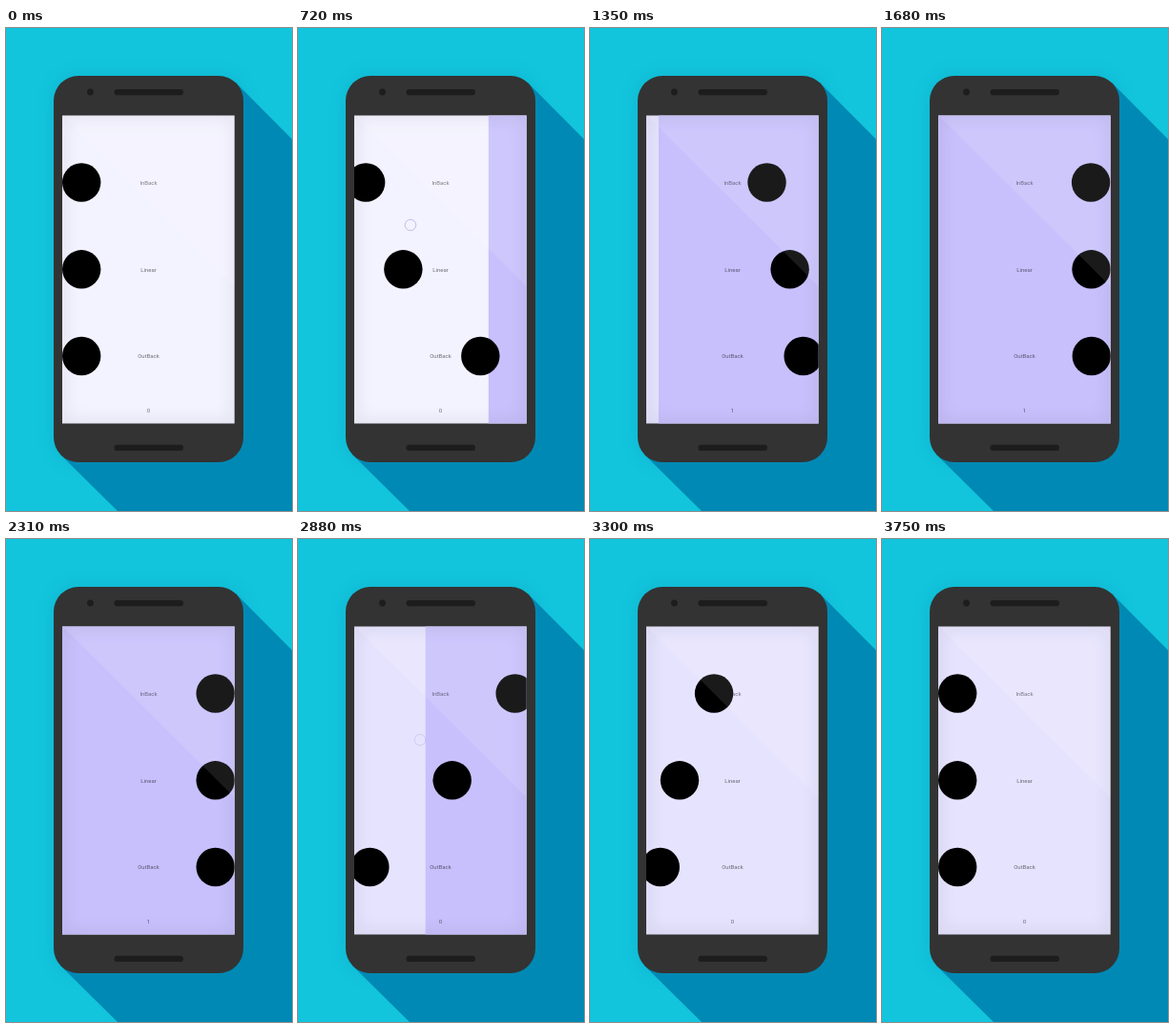
Write an HTML page that moves like this. It is 300 px wide and 505 px high and loops after 4.29 s.

```html
<!DOCTYPE html>
<html lang="en">
<head>
<meta charset="utf-8">
<style>
  html, body { margin: 0; height: 100%; overflow: hidden; background: #12c4dc; }
  svg { display: block; width: 100vw; height: 100vh; }
  text { font: 6px Roboto, sans-serif; fill: rgba(0, 0, 0, .54); text-anchor: middle; }
</style>
</head>
<body>
<svg viewBox="0 0 300 505">
  <defs>
    <clipPath id="screen"><rect x="59" y="91.5" width="180.7" height="322"/></clipPath>
    <filter id="soft" x="-20%" y="-20%" width="140%" height="140%"><feGaussianBlur stdDeviation="9"/></filter>
  </defs>
  <rect x="50" y="50" width="199" height="404" rx="26" fill="#007f96" opacity=".2" filter="url(#soft)"/>
  <path d="M241.4 57.6 300 116.2V505H117L57.6 446.4Z" fill="#0089b4"/>
  <rect x="50" y="50" width="199" height="404" rx="26" fill="#333"/>
  <g fill="#1d1d1d">
    <circle cx="88.5" cy="67" r="3.4"/>
    <rect x="113.5" y="64" width="72.5" height="6.3" rx="3.1"/>
    <rect x="113.5" y="435.8" width="72.5" height="6.3" rx="3.1"/>
  </g>
  <g clip-path="url(#screen)">
    <rect id="light" x="59" y="91" width="182" height="324"/>
    <rect id="violet" y="91" width="182" height="324" fill="#c7c0fc"/>
    <rect x="53" y="85.5" width="193" height="334" fill="none" stroke="#000" stroke-width="20" opacity=".06" filter="url(#soft)"/>
    <text x="149.5" y="164">InBack</text>
    <text x="149.5" y="254.7">Linear</text>
    <text x="149.5" y="345.4">OutBack</text>
    <text id="page" x="149.5" y="401.7">0</text>
    <circle class="ball" cy="161.5" r="20.2"/>
    <circle class="ball" cy="252.3" r="20.2"/>
    <circle class="ball" cy="343" r="20.2"/>
    <circle id="touch" r="5.8" fill="none" stroke="#786ebe"/>
    <path d="M59 91H240V270.5Z" fill="#fff" opacity=".1"/>
  </g>
</svg>
<script>
const LOOP = 4290, SWIPE = 1230, FORWARD = 540, BACK = 2520;
const $ = id => document.getElementById(id);
const balls = document.querySelectorAll('.ball');
const clamp = (v, lo = 0, hi = 1) => Math.min(hi, Math.max(lo, v));

const knots = [[0, 0], [.1, -.037], [.22, -.057], [.41, -.057], [.59, -.025], [.78, .206], [.894, .636], [1, 1]];
const slope = i => {
  const [x0, y0] = knots[Math.max(i - 1, 0)];
  const [x1, y1] = knots[Math.min(i + 1, knots.length - 1)];
  return (y1 - y0) / (x1 - x0);
};

// Hermite curve through the knots
function inBack(x) {
  let i = 0;
  while (i < knots.length - 2 && x > knots[i + 1][0]) i++;
  const [x0, y0] = knots[i], [x1, y1] = knots[i + 1];
  const w = x1 - x0, s = (x - x0) / w, r = 1 - s;
  return y0 * (1 + 2 * s) * r * r + y1 * s * s * (3 - 2 * s)
    + w * s * r * (slope(i) * r - slope(i + 1) * s);
}
const eases = [inBack, u => u, u => 1 - inBack(1 - u)];

// Accelerating drag up to (dragTime, dragged), then a decelerating settle
function swipe(t, dragTime, dragged, end = SWIPE, power = 2.6) {
  if (t < dragTime) return dragged * (clamp(t, 0, dragTime) / dragTime) ** 1.57;
  return 1 - (1 - dragged) * (Math.max(0, end - t) / (end - dragTime)) ** power;
}

function draw(t) {
  const back = t >= 2000;
  const local = t - (back ? BACK : FORWARD);
  const u = back ? swipe(local, 360, .411) : swipe(local, 180, .22);
  const pageU = back ? swipe(local, 360, .411, 760, 1.3) : u;

  balls.forEach((ball, i) => {
    const v = eases[i](u);
    ball.setAttribute('cx', 79.2 + 140.5 * (back ? 1 - v : v));
  });
  $('violet').setAttribute('x', 240 - 181 * (back ? 1 - pageU : pageU));
  $('light').setAttribute('fill', t < 1200 ? '#f3f2ff' : '#e6e3fe');
  $('page').textContent = (u > .3) !== back ? 1 : 0;

  const drag = clamp(u / (back ? .27 : .3));
  const touch = $('touch');
  touch.setAttribute('cx', back ? 79 + 49 * drag : 152 - 46 * drag);
  touch.setAttribute('cy', back ? 205 + 5 * drag : 206);
  const shown = back ? clamp((t - 2310) / 60) : +(t >= 390);
  touch.setAttribute('opacity', .38 * shown * clamp(1 - (local - (back ? 800 - 520 : 240)) / 180));
}

function frame() {
  draw(performance.now() % LOOP);
  requestAnimationFrame(frame);
}
frame();
</script>
</body>
</html>
```
